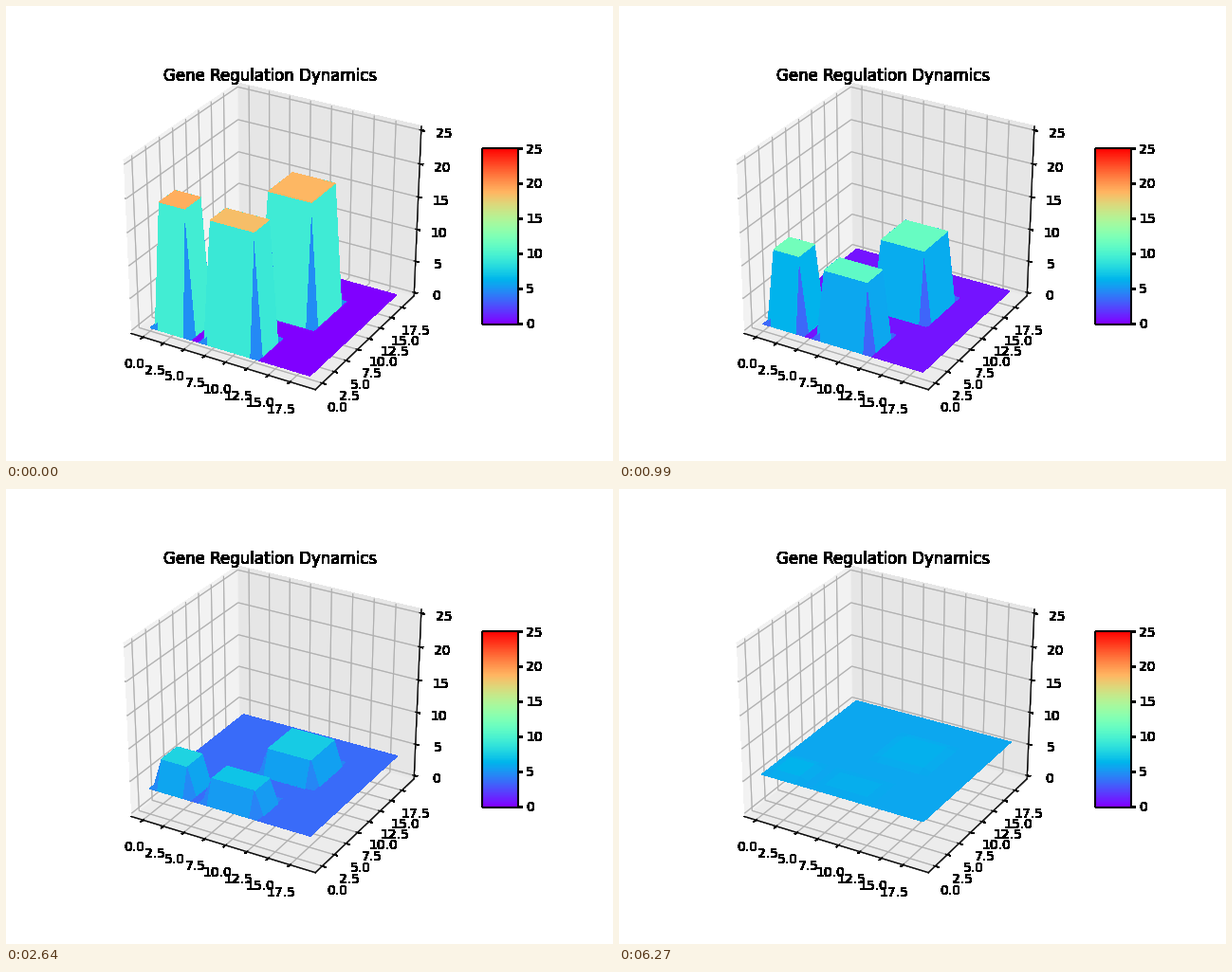
These frames come from a looping animation (640 by 480 pixels, 6600 ms). A matplotlib script:

```python
import matplotlib.pyplot as plt
import numpy as np
from matplotlib.animation import FuncAnimation
from matplotlib.cm import ScalarMappable
from matplotlib.colors import Normalize

FRAMES, INTERVAL = 20, 330
SIZE, ZMAX = 20, 25
NORM = Normalize(0, ZMAX)

# (x range, y range, starting height, decay rate)
BLOCKS = [
    ((1, 5), (1, 5), 18.95, 0.160),
    ((7, 13), (1, 5), 18.30, 0.178),
    ((9, 15), (9, 15), 18.60, 0.170),
]

X, Y = np.meshgrid(np.arange(SIZE), np.arange(SIZE))


def levels(n):
    """Expression level on the grid: rising base plus decaying blocks."""
    rise = (n / 7.23) ** 2.55
    z = np.full(X.shape, 6.2 * rise / (1 + rise))
    for (x0, x1), (y0, y1), height, rate in BLOCKS:
        z[y0:y1, x0:x1] += height * np.exp(-rate * n ** 1.07)
    return z


def solid(img, dpi):
    """Make every touched pixel opaque, for hard-edged text and lines."""
    out = np.round(img * 255).astype(np.uint8)
    out[..., 3] = np.where(out[..., 3] > 0, 255, 0)
    return out, 0, 0


def padded(low, high):
    pad = (high - low) / 48
    return low - pad, high + pad


plt.rcParams["font.family"] = "DejaVu Sans"
fig = plt.figure(figsize=(6.4, 4.8), dpi=100, facecolor="white")

ax = fig.add_axes([0.125, 0.11, 0.62, 0.77], projection="3d")
ax.apply_aspect = lambda position=None: None  # fill the whole rectangle
ax.view_init(elev=30, azim=-60)
ax.set_box_aspect((1, 1, 1), zoom=np.sqrt(3) / 1.8294640721620434)
ax.set_xticks(np.arange(0, 20, 2.5))
ax.set_yticks(np.arange(0, 20, 2.5))
ax.set_zticks(np.arange(0, ZMAX + 1, 5))
margin = 0.05 * (SIZE - 1)
side = padded(-margin, SIZE - 1 + margin)
ax.set_xlim(*side)
ax.set_ylim(*side)
ax.set_zlim(*padded(0, ZMAX))
title = ax.set_title("Gene Regulation Dynamics", y=1.0)
title.set_y(0.92)

cax = fig.add_axes([0.78375, 0.3025, 0.05775, 0.385])
fig.colorbar(ScalarMappable(NORM, "rainbow"), cax=cax)

for a in (ax, cax):
    a.patch.set_facecolor("none")
    a.set_agg_filter(solid)

surface = None


def update(n):
    global surface
    if surface is not None:
        surface.remove()
    surface = ax.plot_surface(X, Y, levels(n), cmap="rainbow", norm=NORM,
                              linewidth=0, antialiased=False)
    return [surface]


anim = FuncAnimation(fig, update, frames=FRAMES, interval=INTERVAL,
                     init_func=lambda: update(0), repeat=True, repeat_delay=0)
plt.show()
```
